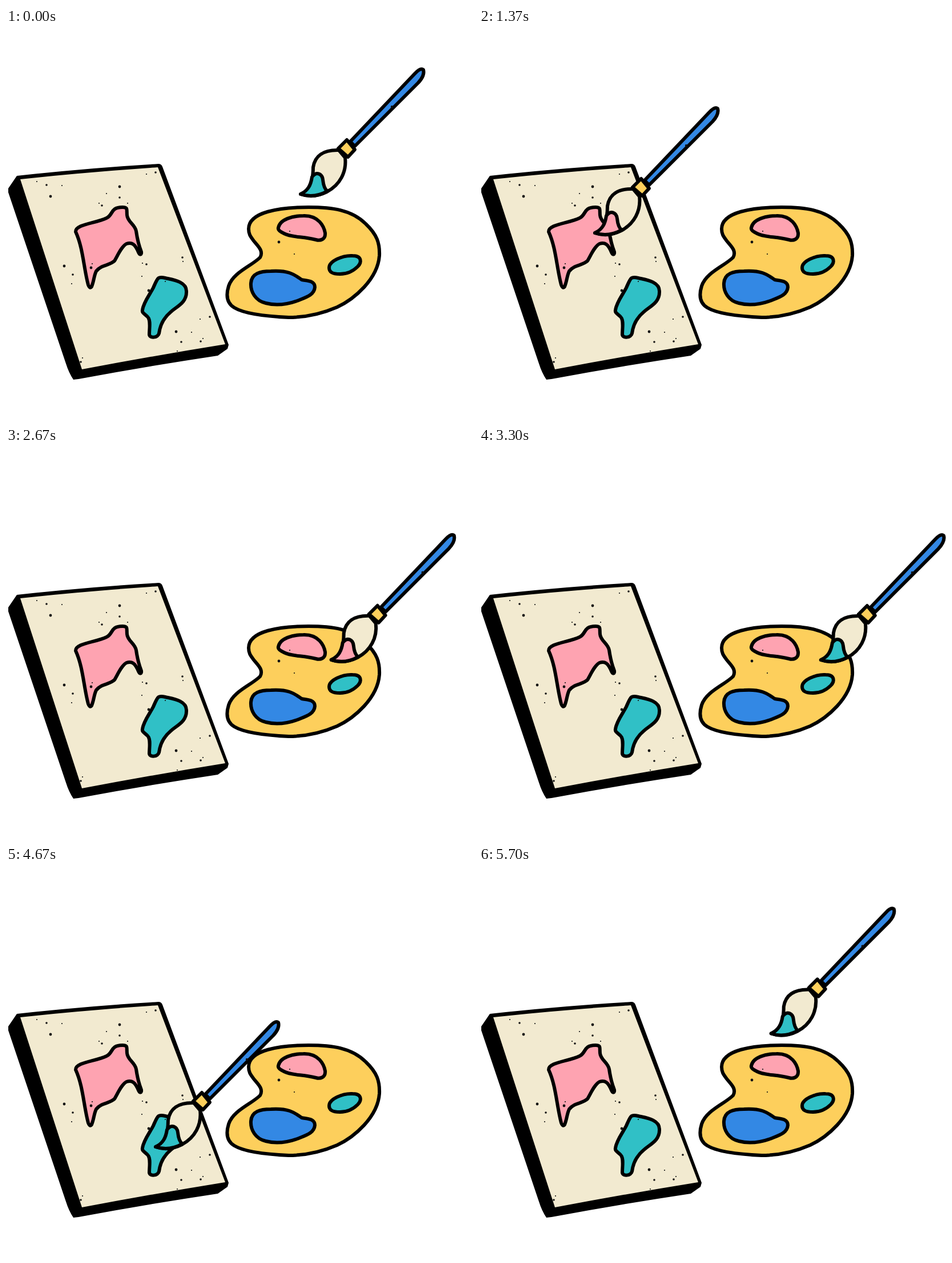
An HTML page for the animation above (5730 ms loop, 818 by 685 pixels).

```html
<!DOCTYPE html>
<html lang="en">
<head>
<meta charset="utf-8">
<title>Brush, palette and canvas</title>
<style>
  html, body { margin: 0; width: 100%; height: 100%; overflow: hidden; background: #fff; }
  svg { display: block; width: 100%; height: 100%; }
  .line { stroke: #000; stroke-width: 6; stroke-linejoin: round; stroke-linecap: round; }
  .dots { stroke: #111; stroke-linecap: round; fill: none; }
  .cream { fill: #f2ead0; }
  .pink { fill: #fea3b1; }
  .teal { fill: #30c0c6; }
  .yellow { fill: #fdcf5c; }
  .blue { fill: #3388e4; }
</style>
</head>
<body>
<svg viewBox="0 0 818 685">
  <g id="board">
    <path d="M19 259Q145 245 267 238Q272 238 274 243L390 555L388 562L371 574Q245 593 127 615L118 616Q110 604 105 588L4 288L4 281Z"/>
    <path class="cream" d="M25 265Q145 252 266 244L384 554Q260 574 133 598Z"/>
    <path class="line pink" d="M122 357C121 344 158 342 176 333C188 328 182 314 204 314C214 314 211 318 212 328C213 340 226 344 228 356C230 370 233 382 237 392C238 398 234 398 232 393C226 378 220 375 211 378C202 383 196 398 190 408C180 417 168 414 158 426C154 434 154 444 150 453C148 456 146 455 144 450C136 420 135 385 122 357Z"/>
    <path class="line teal" d="M258 455C266 437 266 435 279 438C292 441 316 444 316 461C317 482 298 488 288 498C276 508 270 520 268 535C266 543 252 544 251 537C251 526 254 512 248 506C242 500 238 499 239 494C241 480 252 467 258 455Z"/>
  </g>
  <g id="palette">
    <path class="line yellow" d="M425 352C425 322 480 314 530 314C570 314 605 318 630 343C650 362 655 377 654 399C651 440 610 475 580 489C550 502 520 507 495 507C450 505 415 499 400 490C385 481 386 465 390 452C398 428 430 417 445 402C452 390 440 381 434 373C429 366 425 362 425 352Z"/>
    <path class="line pink" d="M477 350C480 335 502 329 521 329C548 328 557 348 559 359C560 371 550 373 543 371C520 365 500 367 487 360C481 357 476 354 477 350Z"/>
    <path class="line teal" d="M566 420C566 408 590 398 607 399C624 399 623 411 616 418C608 426 597 431 585 431C572 431 566 428 566 420Z"/>
    <path class="line blue" d="M429 447C430 430 445 426 464 426C495 424 505 432 518 441C527 443 541 442 541 454C540 468 525 472 510 478C490 485 470 486 455 482C437 478 428 462 429 447Z"/>
  </g>
  <g class="dots">
    <path stroke-width="4.8" d="M78 295h0M199 278h0M102 417h0M149 420h0M250 460h0M298 532h0M478 375h0"/>
    <path stroke-width="3.6" d="M71 275h0M168 311h0M262 253h0M117 432h0M309 402h0M246 414h0M357 506h0M341 549h0M131 585h0M199 297h0M307 550h0"/>
    <path stroke-width="2.2" d="M54 269h0M98 276h0M176 290h0M163 307h0M213 307h0M246 256h0M115 448h0M151 413h0M310 409h0M239 412h0M238 435h0M279 444h0M340 510h0M325 533h0M345 544h0M300 566h0M134 578h0M505 396h0M497 356h0"/>
  </g>
  <g id="brush">
    <path class="line blue" d="M603 199L716 80Q726 69 731 73Q734 83 722 96L611 207Z"/>
    <path class="dots" stroke-width="4.4" d="M676 138h0"/>
    <path class="line cream" d="M583 214C556 213 541 224 538 244C538 267 532 286 516 291C533 297 550 293 562 287C585 275 597 252 594 227Z"/>
    <path id="paint" class="line" d="M536 261C544 250 554 256 555 266C556 276 559 283 563 286C550 293 533 297 516 291C529 285 534 275 536 261Z"/>
    <path class="line yellow" d="M597 196L611 213L599 226L582 211Z"/>
  </g>
</svg>
<script>
const LOOP = 5730;
const brush = document.getElementById('brush');
const paint = document.getElementById('paint');

// Brush offsets: time in drawing steps, x, y, and an optional bend point.
const keys = [
  [0, 0, 0],
  [4, 0, 59],
  [8, 0, 0],
  [17, -313, 68],
  [21, -330, 92],
  [25, -313, 73],
  [34.7, 83, 82.5],
  [37.6, 83, 123],
  [40.8, 83, 82],
  [56, -260, 180],
  [58, -254, 201],
  [72, 0, 0, -170, 98]
];

const ease = u => (1 - Math.cos(Math.PI * u)) / 2;

function position(step) {
  const next = keys.findIndex(key => key[0] > step);
  const [t0, x0, y0] = keys[next - 1];
  const [t1, x1, y1, bendX = (x0 + x1) / 2, bendY = (y0 + y1) / 2] = keys[next];
  const e = ease((step - t0) / (t1 - t0));
  const curve = (a, b, c) => (1 - e) ** 2 * a + 2 * e * (1 - e) * b + e * e * c;
  return [curve(x0, bendX, x1), curve(y0, bendY, y1)];
}

// The drawing advances at 12.5 steps per second on a 30 Hz clock.
function stepAt(ms) {
  const tick = Math.floor((ms % LOOP + 4) * 0.03);
  return Math.min(71, Math.floor(tick / 2.4 + 1e-6));
}

function draw(now) {
  const step = stepAt(now);
  const [x, y] = position(step);
  brush.setAttribute('transform', `translate(${x} ${y})`);
  paint.setAttribute('class', 'line ' + (step >= 4 && step < 38 ? 'pink' : 'teal'));
}

function loop() {
  draw(performance.now());
  requestAnimationFrame(loop);
}
loop();
</script>
</body>
</html>
```
